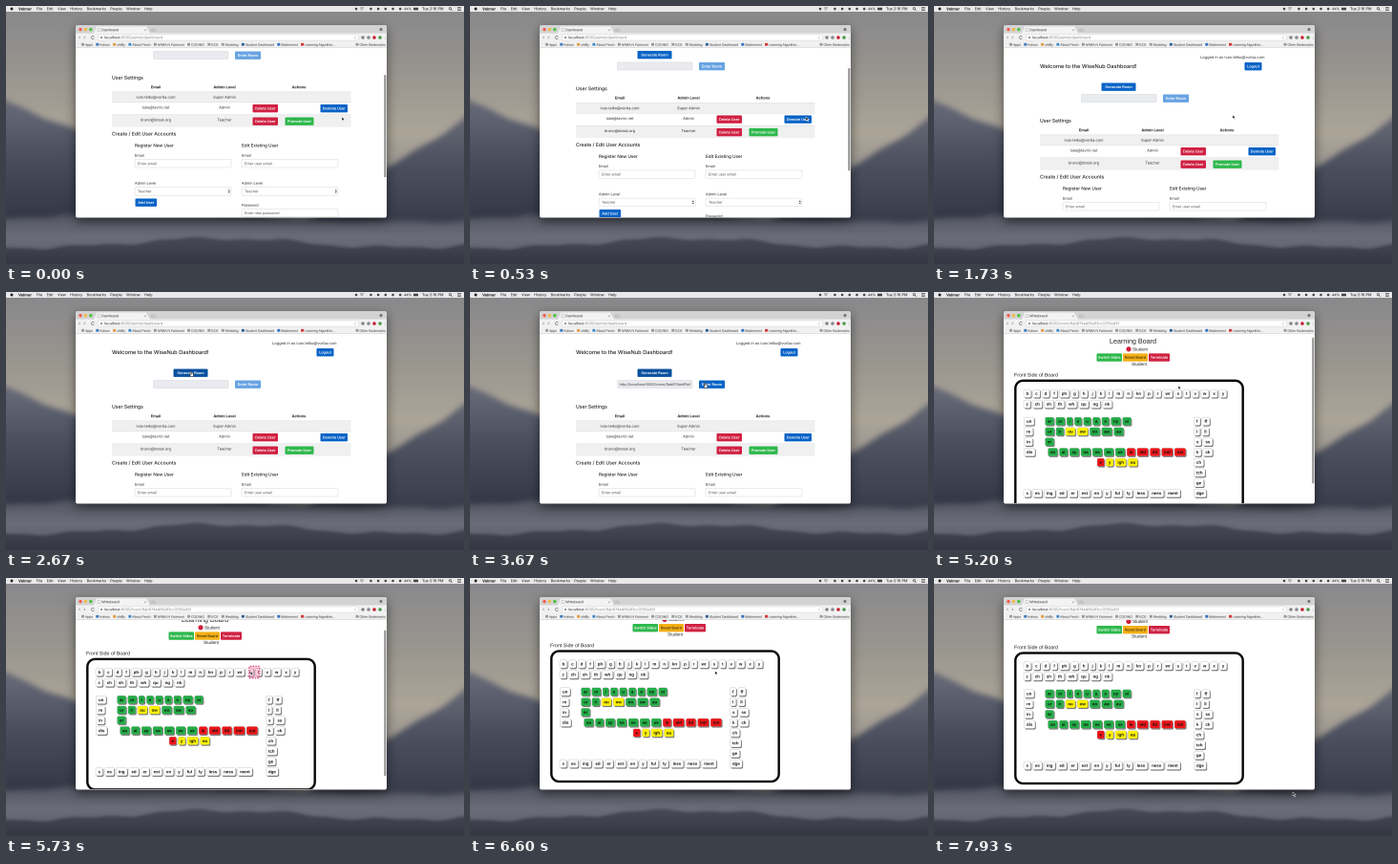
An HTML page with a canvas that plays this animation: 480 by 270 pixels, repeating every 8 s.

```html
<!DOCTYPE html>
<html lang="en">
<head>
<meta charset="utf-8">
<title>Dashboard tour</title>
<style>
html, body { margin: 0; width: 100%; height: 100%; overflow: hidden; background: #777; }
canvas { display: block; width: 480px; height: 270px; }
</style>
</head>
<body>
<canvas id="stage" width="480" height="270"></canvas>
<script>
const LOOP = 8000, W = 480, H = 270, S = 4;   // S: supersampling for smooth small type
const SANS = 'Inter, Roboto, sans-serif';
const ARIAL = '"Liberation Sans", Arial, sans-serif';
const BLUE = '#0863c6', RED = '#d02142', GREEN = '#2db84b';
const INK = '#25282c', GREY = '#666';
const LIME = '#23ad46', YELLOW = '#fff200', CRIMSON = '#ee1519';
const ROOM = 'localhost:8000/room/9ab874ed61e83cc33f3ed3f';

function layer() {
  const c = document.createElement('canvas');
  c.width = W * S;
  c.height = H * S;
  const ctx = c.getContext('2d');
  ctx.scale(S, S);
  ctx.textRendering = 'geometricPrecision';
  return ctx;
}
const back = layer(), scene = layer();
const screen2d = document.getElementById('stage').getContext('2d');
screen2d.imageSmoothingQuality = 'high';
let g = back;

function rect(x, y, w, h, fill, r = 0, line, lw = 0.5) {
  g.beginPath();
  g.roundRect(x, y, w, h, r);
  if (fill) { g.fillStyle = fill; g.fill(); }
  if (line) { g.strokeStyle = line; g.lineWidth = lw; g.stroke(); }
}
function dot(x, y, r, fill) {
  rect(x - r, y - r, 2 * r, 2 * r, fill, r);
}
function poly(points, fill) {
  g.beginPath();
  points.forEach(([x, y]) => g.lineTo(x, y));
  g.closePath();
  g.fillStyle = fill;
  g.fill();
}
// y is the vertical middle; returns the width
function text(s, x, y, size, fill = INK, align = 'left', weight = 400, family = SANS) {
  g.font = `${weight} ${size}px ${family}`;
  g.textAlign = align;
  g.fillStyle = fill;
  g.fillText(s, x, y + size * 0.35);
  return g.measureText(s).width;
}
function button(s, x, y, w, fill, color = '#fff') {
  rect(x, y, w, 8.4, fill, 1);
  text(s, x + w / 2, y + 4.2, 3.8, color, 'center', 600);
}
function clipped(x, y, w, h, paint) {
  g.save();
  g.beginPath();
  g.rect(x, y, w, h);
  g.clip();
  paint();
  g.restore();
}
// Eased interpolation through [time, ...values] keys
function track(t, keys) {
  const i = keys.findIndex(k => k[0] > t);
  if (i < 0) return keys.at(-1).slice(1);
  if (i === 0) return keys[0].slice(1);
  const a = keys[i - 1], b = keys[i];
  const p = (t - a[0]) / (b[0] - a[0]), e = p * p * (3 - 2 * p);
  return a.slice(1).map((v, j) => v + (b[j + 1] - v) * e);
}

function fade(top, bottom, ...colors) {
  const f = g.createLinearGradient(0, top, 0, bottom);
  colors.forEach((c, i) => f.addColorStop(i / (colors.length - 1), c));
  return f;
}
// Fills everything below the wavy line height(x)
function ridge(height, rough, fill) {
  const points = [[W + 20, H + 20], [-20, H + 20]];
  for (let x = -20; x <= W + 20; x += 4) {
    points.push([x, height(x) + rough * (Math.sin(x / 17) + Math.sin(x / 7.3 + 2) / 2)]);
  }
  poly(points, fill);
}
function wallpaper() {
  g.fillStyle = fade(0, 200, '#88888c', '#98958f', '#aca598', '#8d8a8b');
  g.fillRect(0, 0, W, H);
  g.filter = `blur(${3 * S}px)`;
  ridge(x => 98 + x * 0.45, 1.5, fade(95, 220, '#6b6e7b', '#4a4f5f', '#343847'));
  ridge(x => 118 + (W - x) * 0.65, 1.5, fade(115, 220, '#686a76', '#4b4f5e', '#3b3f4d'));
  ridge(x => 222 - 4 * Math.sin(x / 90), 1, fade(215, 270, '#50535f', '#6c6d79', '#565863'));
  g.filter = `blur(${1.5 * S}px)`;
  ridge(x => 248 + 5 * Math.sin(x / 60 + 1), 1.5, fade(243, 270, '#474a56', '#343641'));
  g.filter = 'none';
}

function menuBar() {
  rect(0, 0, W, 6, '#e9e9e9');
  dot(6, 3, 1.5, '#222');
  let x = 13 + text('Velmor', 13, 3, 4, '#111', 'left', 700) + 5;
  for (const s of 'File Edit View History Bookmarks People Window Help'.split(' ')) {
    x += text(s, x, 3, 3.8, '#111') + 4.5;
  }
  text('17', 371, 3, 3.8, '#111');
  for (let i = 0; i < 7; i++) if (i !== 1) dot(367 + i * 7.7, 3, 1.3, '#444');
  text('44%', 417, 3, 3.6, '#111');
  rect(427, 1.7, 5, 2.6, '#444', 0.5);
  text('Tue 2:16 PM', 436, 3, 3.9, '#111');
  g.beginPath();
  g.arc(465.5, 2.7, 1.2, 0, 7);
  g.moveTo(466.4, 3.6);
  g.lineTo(467.6, 4.8);
  for (let y = 1.7; y < 5; y += 1.3) { g.moveTo(473, y); g.lineTo(477, y); }
  g.strokeStyle = '#333';
  g.lineWidth = 0.6;
  g.stroke();
}

function browser() {
  g.save();
  g.shadowColor = 'rgba(0,0,0,.5)';
  g.shadowBlur = 12 * S;
  g.shadowOffsetY = 4 * S;
  rect(73, 20, 326, 201.5, '#fff', 2);
  g.restore();
  rect(73, 20, 326, 10, '#d3d3d4', [2, 2, 0, 0]);
  ['#f25a52', '#f5bb3d', '#53c141'].forEach((c, i) => dot(78 + i * 5.4, 24.6, 1.7, c));
  poly([[92, 28.5], [95, 21.5], [147, 21.5], [151, 28.5]], '#f3f3f3');
  poly([[152, 27], [151, 23.5], [156, 23.5], [157.5, 27]], '#c3c3c4');
  dot(393, 24.5, 1.6, '#777');
  rect(73, 28.5, 326, 15.3, '#f1f1f2');
  rect(96.5, 30, 273, 6, '#fff', 1, '#ccc', 0.4);
  text('‹  ›', 76, 32.6, 5.5, GREY);
  g.beginPath();
  g.arc(91, 33, 1.5, 0.5, 5.8);
  g.strokeStyle = GREY;
  g.lineWidth = 0.6;
  g.stroke();
  dot(100, 33, 1.1, '#888');
  text('☆', 364, 33, 4, '#777', 'left', 400, '"DejaVu Sans", sans-serif');
  ['#888', '#8b8d92', '#cc2030', '#4d9a52'].forEach((c, i) => dot(374 + i * 6, 33, 1.8, c));
  text('⋮', 395.5, 33, 4, '#555');

  let x = 79;
  const mark = (s, color = '#999') => {
    rect(x, 38.8, 3, 2.8, color, 0.5);
    x += 4 + text(s, x + 4, 40.4, 3.5, '#333', 'left', 400, ARIAL) + 3.3;
  };
  mark('Apps');
  mark('Kelvos', '#3c78bd');
  mark('shiftly', '#e19a38');
  mark('About Perch', '#3d8bcc');
  ['NRBA N Fairmont', 'CODING', 'ECE', 'Wedding'].forEach(s => mark(s));
  mark('Student Dashboard', '#2d5d91');
  mark('Mattermost', '#2d6fc0');
  mark('Learning Algorithm...', '#d03030');
  x = 366.5;
  mark('Other Bookmarks');
  rect(73, 43.6, 326, 0.4, '#c5c5c5');
}

function field(x, y, s, select) {
  rect(x, y, 101, 8.5, '#fff', 1, '#ccc', 0.4);
  text(s, x + 3, y + 4.3, 3.8, '#555');
  if (select) {
    const c = x + 98.8, m = y + 4.25;
    for (const d of [-1, 1]) poly([[c - 1, m + d * 0.5], [c, m + d * 2], [c + 1, m + d * 0.5]], '#333');
  }
}
function userRow(y, mail, level) {
  text(mail, 157, y, 3.9, '#333', 'center');
  text(level, 229, y, 3.9, '#333', 'center');
}
function heading(s, y) {
  text(s, 111, y, 5.1, '#222', 'left', 500);
}
function form(x, title, hint) {
  text(title, x, 191, 4.6, '#222', 'left', 500);
  text('Email', x, 201.3, 3.8);
  field(x, 205.5, hint);
  text('Admin Level', x, 230.5, 3.8);
  field(x, 234.7, 'Teacher', true);
}

function dashboard(t) {
  const ready = t >= 2900;
  text('Logged in as ivan.telko@vorba.com', 346.5, 53.5, 4, '#333', 'right');
  text('Welcome to the WiseNub Dashboard!', 111, 63, 5.7, '#222', 'left', 500);
  button('Logout', 325.5, 59, 18, BLUE);
  button('Generate Room', 175.5, 80.5, 36, t >= 2600 ? '#07509f' : BLUE);
  rect(154.5, 92.5, 78.5, 8, '#e9ebee', 1, '#c9ccd0', 0.4);
  if (ready) clipped(156, 92, 75, 9, () => text('http://' + ROOM, 156.5, 96.6, 3.75, '#444'));
  button('Enter Room', 240, 92.5, 27, ready ? BLUE : '#68a3e2');

  heading('User Settings', 120);
  text('Email', 157, 129.8, 3.9, '#222', 'center', 700);
  text('Admin Level', 229, 129.8, 3.9, '#222', 'center', 700);
  text('Actions', 307, 129.8, 3.9, '#222', 'center', 700);
  rect(111, 135, 250.5, 10.6, '#f0f0f0');
  rect(111, 158.5, 250.5, 13.2, '#f0f0f0');
  for (const y of [134.6, 145.6, 158.5]) rect(111, y, 250.5, 0.5, '#d9dcdf');
  userRow(140.5, 'ivan.telko@vorba.com', 'Super Admin');
  userRow(151.2, 'luke@tavrin.net', 'Admin');
  userRow(164.2, 'bruno@brask.org', 'Teacher');
  for (const y of [148, 161.5]) button('Delete User', 258.5, y, 26.5, RED);
  button('Demote User', 329.5, 148, 28.5, BLUE);
  button('Promote User', 292.5, 161.5, 30, GREEN);

  heading('Create / Edit User Accounts', 178.7);
  form(135, 'Register New User', 'Enter email');
  form(247, 'Edit Existing User', 'Enter user email');
  button('Add User', 135.5, 246.5, 22.5, BLUE);
  text('Password', 247, 253.5, 3.8);
  field(247, 257.3, 'Enter new password');
}

// Lays out lettered tiles from the left edge x; returns the next free x
function tiles(words, x, y, fill = '#fff') {
  g.font = `700 4.4px ${ARIAL}`;
  for (const s of words.split(' ')) {
    const w = g.measureText(s).width + 5;
    rect(x + 0.9, y - 3.3, w, 8.6, 'rgba(0,0,0,.55)', 1.6);
    rect(x, y - 4.2, w, 8.4, fill, 1.5, '#aaa', 0.3);
    text(s, x + w / 2, y, 4.4, '#111', 'center', 700, ARIAL);
    x += w + 2;
  }
  return x;
}

function board(t) {
  text('Learning Board', 208.5, 55, 7.2, '#222', 'center', 400, ARIAL);
  dot(204, 63.5, 2.6, '#cf1f3a');
  text('Student', 208, 63.5, 4.6, '#222', 'left', 400, ARIAL);
  button('Switch Sides', 170.5, 68, 26.5, GREEN);
  button('Reset Board', 198, 68, 26, '#f5b016', '#4a3a10');
  button('Terminate', 225, 68, 22, RED);
  text('Student', 215, 79, 4.6, '#222', 'center', 400, ARIAL);
  text('Front Side of Board', 84, 90.3, 5.3, '#222', 'left', 400, ARIAL);
  rect(85.3, 96.5, 238.4, 136.5, '#fff', 8, '#050505', 2.4);

  const line = i => 139 + i * 10.75;
  tiles('b c d f ph g h j k l m n kn p r wr s t v w x y', 94, 110);
  tiles('z ch sh th wh qu ng nk', 94, 121);
  ['un', 're', 'in', 'dis'].forEach((s, i) => tiles(s, 94.5, line(i)));
  tiles('ar or i e u a o oy oi', 116.5, line(0), LIME);
  let x = tiles('ur ir', 116.5, line(1), LIME);
  x = tiles('ou ow', x, line(1), YELLOW);
  tiles('oo aw au', x, line(1), LIME);
  tiles('er', 116.5, line(2), LIME);
  x = tiles('ea ai ay oa oe ee ue', 119.5, line(3), LIME);
  tiles('ie old ild ind ost', x, line(3), CRIMSON);
  x = tiles('e', 171, line(4), CRIMSON);
  tiles('y igh ea', x, line(4), YELLOW);
  tiles('s es ing ed er est en y ful ly less ness ment', 94, line(7));
  ['f ff', 'l ll', 's ss', 'k ck', 'ch', 'tch', 'ge', 'dge'].forEach((s, i) => tiles(s, 272.5, line(i)));

  if (t > 5600 && t < 6000) {
    g.setLineDash([1.4, 1.4]);
    rect(254.8, 104, 11, 12.4, 'rgba(240,100,150,.35)', 1, '#d8387a', 1.2);
    g.setLineDash([]);
  }
}

function pointer(x, y, hand) {
  g.save();
  g.translate(x - 1, y - 2);
  if (hand) {
    rect(0, 1, 3.4, 3.6, '#fff', 1, '#111', 0.5);
    rect(0.3, -0.8, 1.2, 3, '#fff', 0.6, '#111', 0.4);
  } else {
    g.lineJoin = 'round';
    poly([[0, 0], [0, 4], [1, 3.2], [2.1, 5.1], [2.5, 4.8], [1.6, 2.9], [3, 2.8]], '#111');
    g.strokeStyle = '#fff';
    g.lineWidth = 0.4;
    g.stroke();
  }
  g.restore();
}

const homePage = {
  title: 'Dashboard', url: 'localhost:8000/admin/dashboard', paint: dashboard, height: 290,
  scroll: [[70, 45], [1470, 0]], barFrom: 0, barTo: 1470
};
const boardPage = {
  title: 'Whiteboard', url: ROOM, paint: board, height: 204,
  scroll: [[5000, 0], [5530, 11.5], [5670, 11.5], [6470, 20], [6620, 20], [7330, 18]],
  barFrom: 5000, barTo: 6500
};
const path = [[930, 353, 118], [1470, 314, 116], [1730, 314, 116], [2530, 194, 86], [3270, 194, 86],
  [3700, 247, 98], [4700, 257, 100], [7400, 258, 99], [7930, 377, 226]];

wallpaper();
menuBar();
browser();
g = scene;

function draw(t) {
  const page = t < 4250 ? homePage : boardPage;
  g.drawImage(back.canvas, 0, 0, W, H);
  rect(96, 23.7, 2.4, 2.8, '#fff', 0.3, '#888', 0.4);
  text(page.title, 100, 25, 3.7, '#333', 'left', 400, ARIAL);
  text('×', 146, 25, 4, '#777', 'center');
  const [host, rest] = page.url.split(':');
  const w = text(host, 103, 33, 3.9, '#222');
  text(':' + rest, 103 + w, 33, 3.9, '#888');

  const [scroll] = track(t, page.scroll);
  clipped(73, 44, 326, 177, () => {
    g.translate(0, -scroll);
    page.paint(t);
  });
  if (t >= page.barFrom && t < page.barTo) {
    const k = 177 / page.height;
    rect(396.3, 44.5 + scroll * k, 2, 176 * k, '#8d8d8d', 1);
  }
  const [x, y] = track(t, path);
  pointer(x, y, (t > 2450 && t < 3350) || (t > 3600 && t < 4250));
  screen2d.drawImage(scene.canvas, 0, 0, W, H);
}

function frame() {
  draw(performance.now() % LOOP);
  requestAnimationFrame(frame);
}
frame();
</script>
</body>
</html>
```
